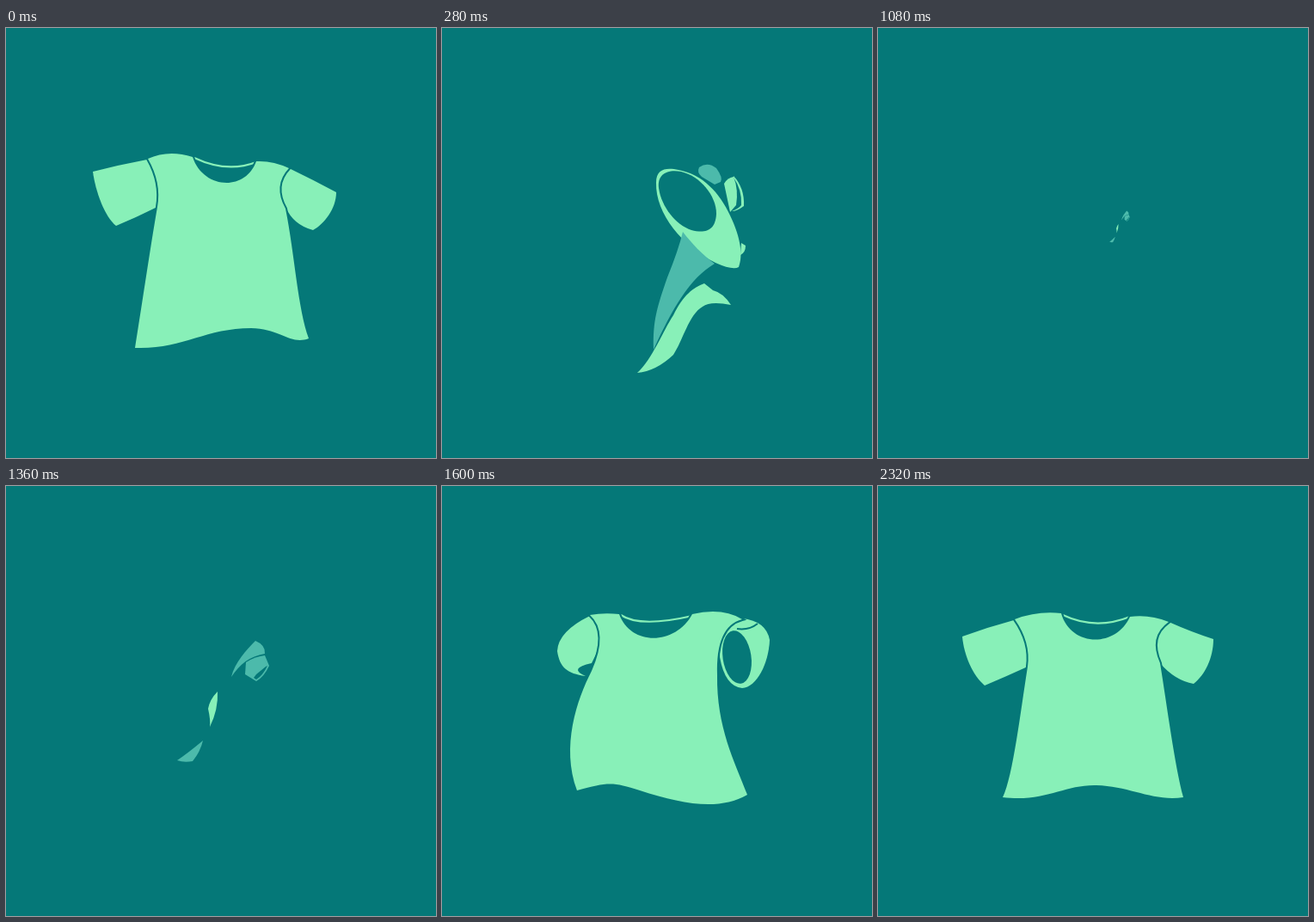
Animation of 500x500 px, one loop 2440 ms. Source, as an HTML page with a canvas:

```html
<!DOCTYPE html>
<html lang="en">
<head>
<meta charset="utf-8">
<title>Spinning shirt</title>
<style>
html, body { margin: 0; width: 100%; height: 100%; overflow: hidden; background: #057878; }
canvas { display: block; width: 100vmin; height: 100vmin; }
</style>
</head>
<body>
<canvas id="stage" width="500" height="500"></canvas>
<script>
const ctx = document.getElementById('stage').getContext('2d');
const LOOP = 2440;
const BG = '#057878', MINT = '#88f0b8', MID = '#4cbaab';

// Moments at which the drawing advances; it holds in between.
const STEPS = [0, 80, 160, 200, 240, 280, 320, 400, 480, 560, 640,
  960, 1040, 1120, 1160, 1200, 1240, 1280, 1320, 1360, 1400, 1440, 1480,
  1520, 1560, 1600, 1640, 1680, 1760, 1840, 1960, 2080, 2200, 2320];

// Shirt poses share one path structure, so they can be blended.
const folded = {
  body: 'M206 149 C220 187 272 185 291 149 Q326 141 349 155 Q318 163 320 220 C319 280 340 320 355 359 C322 378 280 370 230 354 C199 344 193 344 157 354 C138 303 157 248 174 215 Q194 170 172 150 Q188 147 206 149Z',
  left: 'M172 151 Q135 169 134 192 C137 211 145 218 167 221 Q146 212 174 206 Q194 170 172 151Z',
  right: 'M349 154 Q377 157 381 179 C380 206 366 234 349 235 Q329 233 323 199 Q322 168 349 154Z',
  collar: 'M208 150 Q230 165 291 151',
  cuff: [343, 199, 16.5, 31, -0.15]
};
const flung = {
  body: 'M208 150 C218 182 280 184 298 149 Q326 143 350 154 Q326 172 329 205 C336 260 348 322 362 372 C325 386 295 381 280 374 C246 355 205 343 148 358 C153 318 164 260 174 212 Q179 184 161 156 Q185 146 208 150Z',
  left: 'M160 157 Q130 169 99 185 C103 204 113 224 127 231 Q150 221 174 212 Q179 184 160 157Z',
  right: 'M350 154 Q387 150 423 164 C418 188 409 207 394 220 Q358 216 331 204 Q328 172 350 154Z',
  collar: 'M210 151 Q250 163 296 150',
  cuff: [394, 192, 0, 20, -0.1]
};
const spread = {
  body: 'M208 150 C222 184 280 183 297 149 Q322 148 342 154 Q320 172 331 205 C341 260 347 310 358 364 C326 370 306 369 285 368 C247 362 222 332 145 356 C150 318 167 260 173 212 Q178 184 159 158 Q185 148 208 150Z',
  left: 'M158 158 Q130 170 92 185 C99 207 109 224 123 232 Q150 222 173 212 Q178 184 158 158Z',
  right: 'M343 154 Q373 160 404 172 C400 195 390 215 376 226 Q348 219 331 203 Q322 172 343 154Z',
  collar: 'M210 151 Q250 162 296 150'
};
const level = {
  body: 'M213 148 C224 187 276 189 293 152 Q316 149 338 158 Q314 175 328 206 C336 255 345 325 355 362 C319 367 293 349 254 348 C216 347 195 368 145 362 C157 338 166 260 174 210 Q178 182 159 155 Q185 145 213 148Z',
  left: 'M158 156 Q128 164 98 175 C100 197 110 220 124 232 Q150 221 174 210 Q178 182 158 156Z',
  right: 'M338 158 Q365 170 390 178 C390 200 380 220 367 230 Q345 226 328 206 Q314 175 338 158Z',
  collar: 'M215 150 Q253 168 293 152'
};
const turned = {
  body: 'M217 150 C229 187 278 191 291 155 Q310 154 329 163 Q310 183 325 210 C336 265 339 325 352 361 C331 369 320 350 285 349 C231 349 205 374 150 372 C157 329 167 260 176 208 Q181 180 165 152 Q189 141 217 150Z',
  left: 'M164 153 Q132 159 101 167 C104 190 115 220 128 230 Q152 220 176 208 Q181 180 164 153Z',
  right: 'M329 163 Q356 176 384 191 C384 210 370 228 357 235 Q334 229 325 208 Q310 183 329 163Z',
  collar: 'M219 151 Q257 169 291 156'
};

// Sideways view with one sleeve opening toward the viewer.
const profile = [
  [MID, 'M299 162 Q309 155 319 163 Q327 174 324 179 L317 182 L302 173 Q296 168 299 162Z'],
  [MINT, 'M328 181 Q332 174 339 173 Q345 188 342 206 L335 214Z'],
  [MINT, 'M339 172 Q352 186 351 207 Q343 213 337 213 Q345 210 348 206 Q349 188 339 174Z'],
  [MINT, 'M348 250 L353 253 Q353 261 347 264Z'],
  [MINT, 'M249 180 C249 164 260 162 275 165 C303 170 323 192 335 218 C348 245 350 265 345 278 Q338 282 318 273 C280 254 248 216 249 180Z'],
  [BG, 'M252 186 C250 170 262 164 278 167 C300 172 319 195 319 216 C318 236 306 239 290 235 C272 229 255 208 252 186Z'],
  [MID, 'M280 237 C290 250 303 264 317 274 C288 291 268 326 246 374 C245 340 250 325 262 290 Q275 258 280 237Z'],
  [MINT, 'M305 297 L315 305 Q327 308 336 322 Q312 317 303 324 C287 333 280 364 269 380 Q249 399 227 401 C244 386 257 352 269 334 C281 310 292 302 305 297Z']
];

const ribbon = [
  [MID, 'M262 222 C266 205 280 190 290 180 Q302 185 301 195 C283 198 272 207 262 222Z'],
  [MID, 'M279 205 Q290 198 301 197 L306 209 Q300 222 291 227 L278 219Z'],
  [BG, 'M288 223 L291 219 L302 210 L304 209 Q299 220 291 225Z'],
  [MINT, 'M246 239 Q247 260 237 280 Q238 272 235 259 Q237 248 246 239Z'],
  [MID, 'M229 296 Q211 311 199 319 Q207 322 217 320 Q226 309 229 296Z']
];

const NUMBER = /-?\d+(?:\.\d+)?/g;
const lerp = (a, b, u) => a + (b - a) * u;

function blendPath(a, b, u) {
  const goal = b.match(NUMBER);
  let i = 0;
  return a.replace(NUMBER, n => lerp(+n, +goal[i++], u));
}

function blendShirt(a, b, u) {
  const pose = {};
  for (const part of ['body', 'left', 'right', 'collar']) pose[part] = blendPath(a[part], b[part], u);
  if (a.cuff && b.cuff) pose.cuff = a.cuff.map((n, i) => lerp(n, b.cuff[i], u));
  return pose;
}

// Keys are [time, ...values], interpolated linearly.
function track(t, keys) {
  let i = 1;
  while (i < keys.length - 1 && t >= keys[i][0]) i++;
  const [a, b] = [keys[i - 1], keys[i]];
  const u = Math.min(1, Math.max(0, (t - a[0]) / (b[0] - a[0])));
  return a.slice(1).map((n, j) => lerp(n, b[j + 1], u));
}

function fill(path, color) {
  ctx.fillStyle = color;
  ctx.fill(new Path2D(path));
}

function stroke(path, color, width) {
  ctx.strokeStyle = color;
  ctx.lineWidth = width;
  ctx.stroke(new Path2D(path));
}

function drawShirt(pose) {
  stroke(pose.collar, MINT, 2.2);
  fill(pose.left, MINT);
  fill(pose.right, MINT);
  if (pose.cuff) {
    ctx.fillStyle = BG;
    ctx.beginPath();
    ctx.ellipse(...pose.cuff, 0, Math.PI * 2);
    ctx.fill();
  }
  if (pose === folded) stroke('M343 166 Q357 168 367 160', BG, 2);
  stroke(pose.body, BG, 4);
  fill(pose.body, MINT);
}

function scaled(px, py, [sx, sy], draw) {
  ctx.save();
  ctx.translate(px, py);
  ctx.scale(sx, sy);
  ctx.translate(-px, -py);
  draw();
  ctx.restore();
}

const drawLayers = layers => layers.forEach(([color, path]) => fill(path, color));

function drawScene(t) {
  ctx.fillStyle = BG;
  ctx.fillRect(0, 0, 500, 500);
  if (t < 240) {
    const size = track(t, [[0, 1, 1], [80, 0.96, 1], [160, 0.78, 1.02], [200, 0.55, 1.04]]);
    const pose = t ? blendShirt(level, turned, 1 + Math.min(t / 160, 0.8)) : turned;
    scaled(285, 200, size, () => drawShirt(pose));
  } else if (t < 640) {
    const size = track(t, [[240, 1.15, 1.01], [280, 1, 1], [320, 0.75, 0.9], [400, 0.42, 0.6], [480, 0.2, 0.28], [560, 0.09, 0.025]]);
    scaled(t > 280 ? 222 : 290, 156, size, () => drawLayers(profile));
  } else if (t >= 960 && t < 1520) {
    const size = track(t, [[960, 0.1, 0.1], [1160, 0.4, 0.5], [1360, 1, 1], [1480, 1.2, 1.5]]);
    scaled(289, 224, size, () => drawLayers(ribbon));
  } else if (t >= 1520 && t <= 1600) {
    const size = track(t, [[1520, 0.55, 1.02], [1560, 0.82, 1.01], [1600, 1, 1]]);
    scaled(245, 200, size, () => drawShirt(folded));
  } else if (t > 1600) {
    if (t < 1680) drawShirt(blendShirt(folded, flung, (t - 1600) / 80));
    else if (t < 1840) drawShirt(blendShirt(flung, spread, (t - 1680) / 160));
    else drawShirt(blendShirt(spread, level, (t - 1840) / 480));
  }
}

function frame(now) {
  const t = now % LOOP;
  drawScene(STEPS.filter(s => s <= t).pop() || 0);
  requestAnimationFrame(frame);
}
requestAnimationFrame(frame);
</script>
</body>
</html>
```
